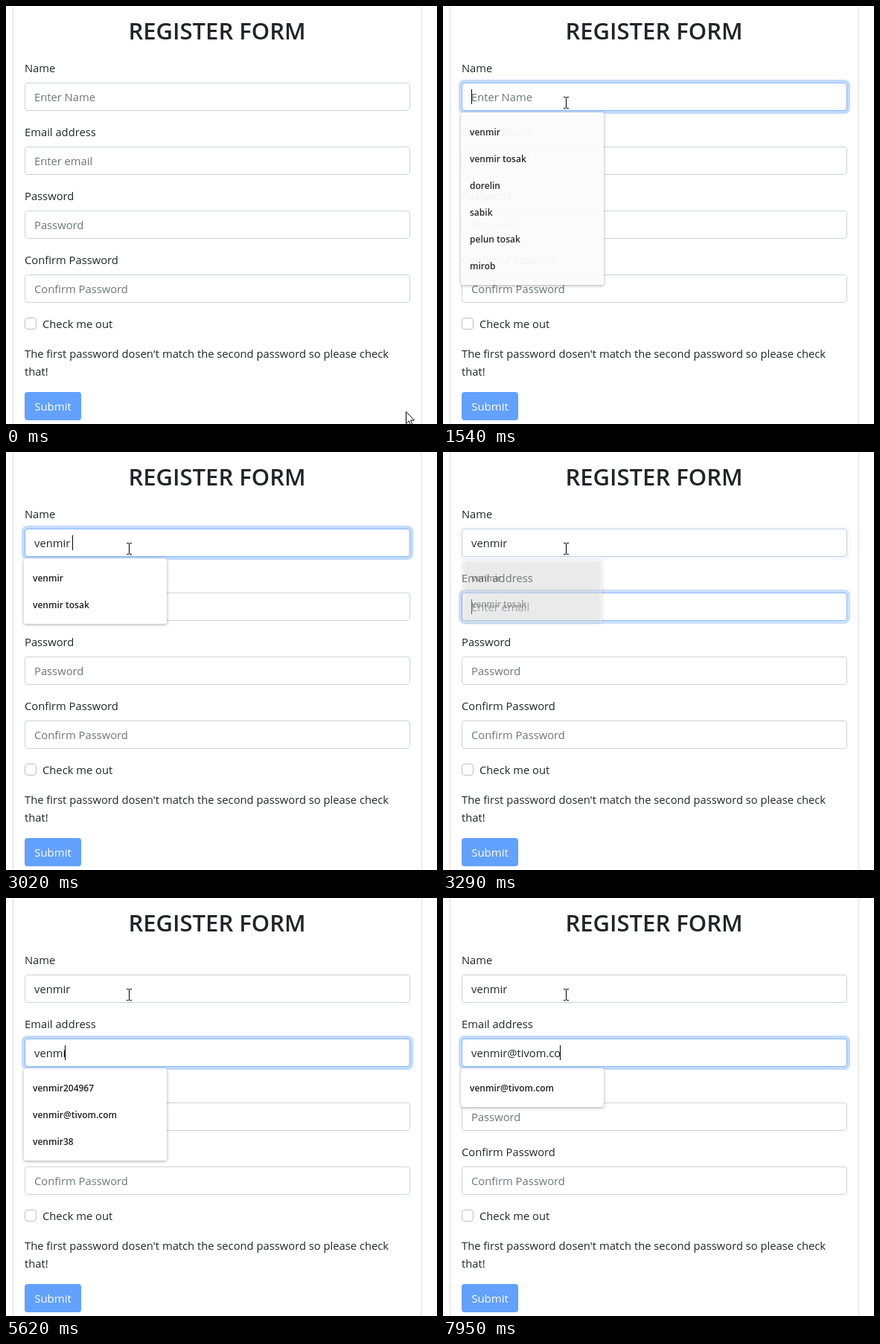
These frames come from a looping animation (579x562 px, 8000 ms). An HTML page with a canvas:

```html
<!DOCTYPE html>
<html lang="en">
<head>
<meta charset="utf-8">
<title>Register form</title>
<style>
  html, body { margin: 0; width: 579px; height: 562px; overflow: hidden; background: #fff; }
  canvas { display: block; }
</style>
</head>
<body>
<canvas id="stage" width="579" height="562"></canvas>
<script>
const LOOP = 8000;
const FAMILY = '"Open Sans", "Noto Sans", sans-serif';
const BODY = `14.75px ${FAMILY}`;
const INK = '#212529';
const MUTED = '#6c757d';
const FIELD = { x: 25, w: 518, h: 38 };
const BLINK = 530;

const ctx = document.getElementById('stage').getContext('2d');
const clamp = (v) => Math.min(1, Math.max(0, v));
const lerp = (a, b, k) => a + (b - a) * k;
const ramp = (t, start, length) => {
  const k = clamp((t - start) / length);
  return 1 - (1 - k) ** 2;
};

// Each key press: [time, text in the field afterwards]
const keys = (word, times) => times.map((time, i) => [time, word.slice(0, i + 1)]);
const nameKeys = keys('venmir ', [2220, 2320, 2420, 2520, 2620, 2820, 3020]);
const emailKeys = [
  [4220, 'v'], [4890, ''],
  ...keys('venmir@tivom.co', [5150, 5240, 5330, 5420, 5620, 5750, 6550,
    6880, 7080, 7180, 7280, 7480, 7680, 7880, 7950])
];

const fields = [
  { y: 103, label: 'Name', hint: 'Enter Name', keys: nameKeys, focus: 1400, blur: 3200 },
  { y: 189, label: 'Email address', hint: 'Enter email', keys: emailKeys, focus: 3200, blur: Infinity },
  { y: 275, label: 'Password', hint: 'Password' },
  { y: 361, label: 'Confirm Password', hint: 'Confirm Password' }
];

const names = ['venmir', 'venmir tosak', 'dorelin', 'sabik', 'pelun tosak', 'mirob'];
const mails = ['venmir204967', 'venmir@tivom.com', 'venmir38'];
const popups = [
  { from: 1470, to: 2220, y: 143, items: names, fadeIn: 130 },
  { from: 2220, to: 3220, y: 143, items: names.slice(0, 2), fadeOut: 190 },
  { from: 5150, to: 6550, y: 229, items: mails, fadeIn: 130 },
  { from: 6550, to: 6615, y: 229, items: mails, cut: 58 },
  { from: 6615, to: LOOP, y: 229, items: mails.slice(1, 2) }
];

// The pointer moves in discrete hops
const moves = [
  { start: 70, end: 260, hops: 4, to: [406, 292] },
  { start: 520, end: 1070, hops: 9, to: [158, 149] },
  { start: 1140, end: 1280, hops: 3, to: [165, 133] },
  { start: 1340, end: 1341, hops: 1, to: [165, 130] }
];

function text(str, x, y, color = INK, font = BODY, align = 'left') {
  ctx.font = font;
  ctx.fillStyle = color;
  ctx.textAlign = align;
  ctx.fillText(str, x, y);
}

function box(x, y, w, h, r, fill, stroke) {
  ctx.beginPath();
  ctx.roundRect(x, y, w, h, r);
  if (fill) {
    ctx.fillStyle = fill;
    ctx.fill();
  }
  if (stroke) {
    ctx.beginPath();
    ctx.roundRect(x + 0.5, y + 0.5, w - 1, h - 1, r - 0.5);
    ctx.strokeStyle = stroke;
    ctx.lineWidth = 1;
    ctx.stroke();
  }
}

function withAlpha(alpha, draw) {
  ctx.save();
  ctx.globalAlpha *= alpha;
  draw();
  ctx.restore();
}

function drawField(f, t) {
  const { x, w, h } = FIELD;
  text(f.label, x, f.y - 14);

  const glow = f.keys ? ramp(t, f.focus, 150) - ramp(t, f.blur, 150) : 0;
  withAlpha(glow, () => box(x - 4, f.y - 4, w + 8, h + 8, 8, '#c2dbfe'));
  box(x, f.y, w, h, 4, '#fff', '#ced4da');
  withAlpha(glow, () => box(x, f.y, w, h, 4, null, '#86b7fe'));

  const pressed = (f.keys || []).filter(([time]) => time <= t);
  const value = pressed.length ? pressed.at(-1)[1] : '';
  text(value || f.hint, x + 13, f.y + 25, value ? INK : MUTED);

  if (!f.keys || t < f.focus || t >= f.blur) return;
  const lastInput = pressed.filter(([, str]) => str).at(-1);
  const since = lastInput ? lastInput[0] : f.focus + (f.y === 103 ? 80 : 30);
  if ((t - since) % (2 * BLINK) < BLINK) {
    ctx.fillStyle = '#000';
    ctx.fillRect(Math.round(x + 13 + ctx.measureText(value).width) - (value ? 1 : 0), f.y + 9, 1, 20);
  }
}

function drawPopup(p, t) {
  const leaving = p.fadeOut ? clamp((t - p.to) / p.fadeOut) : 0;
  if (t < p.from || (p.fadeOut ? leaving === 1 : t >= p.to)) return;
  const alpha = (p.fadeIn ? ramp(t, p.from - 30, p.fadeIn) : 1) * (1 - ramp(leaving, 0, 1));
  const h = 16 + 36 * p.items.length;
  const scale = 1 - 0.07 * leaving;

  withAlpha(alpha, () => {
    ctx.translate(120, p.y + h / 2);
    ctx.scale(scale, scale);
    ctx.translate(-120, -p.y - h / 2);
    if (p.cut) {
      ctx.beginPath();
      ctx.rect(18, p.y - 4, 204, p.cut + 4);
      ctx.clip();
    }
    ctx.save();
    ctx.shadowColor = 'rgba(0,0,0,.35)';
    ctx.shadowBlur = 4;
    ctx.shadowOffsetY = 1;
    box(24, p.y, 192, h, 3, '#fff');
    ctx.restore();
    p.items.forEach((item, i) =>
      text(item, 36, p.y + 31 + 36 * i, '#1f1f1f', `600 12px ${FAMILY}`));
  });
}

function pointerAt(t) {
  let at = [537, 545];
  for (const { start, end, hops, to } of moves) {
    if (t < start) break;
    const hop = Math.floor((t - start) / ((end - start) / Math.max(1, hops - 1)) + 1.01);
    const k = clamp(hop / hops);
    at = at.map((v, i) => Math.round(lerp(v, to[i], k)));
  }
  return at;
}

function drawPointer(t) {
  const [x, y] = pointerAt(t);
  const overField = fields.some((f) =>
    x >= FIELD.x && x < FIELD.x + FIELD.w && y >= f.y && y < f.y + FIELD.h);

  ctx.save();
  ctx.translate(x, y);
  if (overField) {
    ctx.fillStyle = '#000';
    ctx.fillRect(0, -7, 1, 14);
    for (const edge of [-8, 7]) {
      ctx.fillRect(-3, edge, 3, 1);
      ctx.fillRect(1, edge, 3, 1);
    }
  } else {
    const arrow = new Path2D('M.5 .5V16.5L4.2 13 6.7 18.5 9 17.5 6.6 12H11.5Z');
    ctx.fillStyle = '#fff';
    ctx.fill(arrow);
    ctx.strokeStyle = '#000';
    ctx.lineWidth = 1;
    ctx.stroke(arrow);
  }
  ctx.restore();
}

function draw(t) {
  ctx.fillStyle = '#fff';
  ctx.fillRect(0, 0, 579, 562);
  ctx.fillStyle = '#dfdfdf';
  ctx.fillRect(9, 0, 1, 562);
  ctx.fillRect(558, 0, 1, 562);

  text('REGISTER FORM', 283.5, 45, INK, `600 31px ${FAMILY}`, 'center');
  fields.forEach((f) => drawField(f, t));

  box(25, 419, 16, 16, 4, '#fff', '#bfbfbf');
  text('Check me out', 49, 433);
  text("The first password dosen't match the second password so please check", 25, 473);
  text('that!', 25, 497);
  box(25, 519, 76, 38, 4, '#62a1fe');
  text('Submit', 63, 544, '#fff', `500 15px ${FAMILY}`, 'center');

  popups.forEach((p) => drawPopup(p, t));
  drawPointer(t);
}

function tick() {
  draw(performance.now() % LOOP);
  requestAnimationFrame(tick);
}
tick();
</script>
</body>
</html>
```
